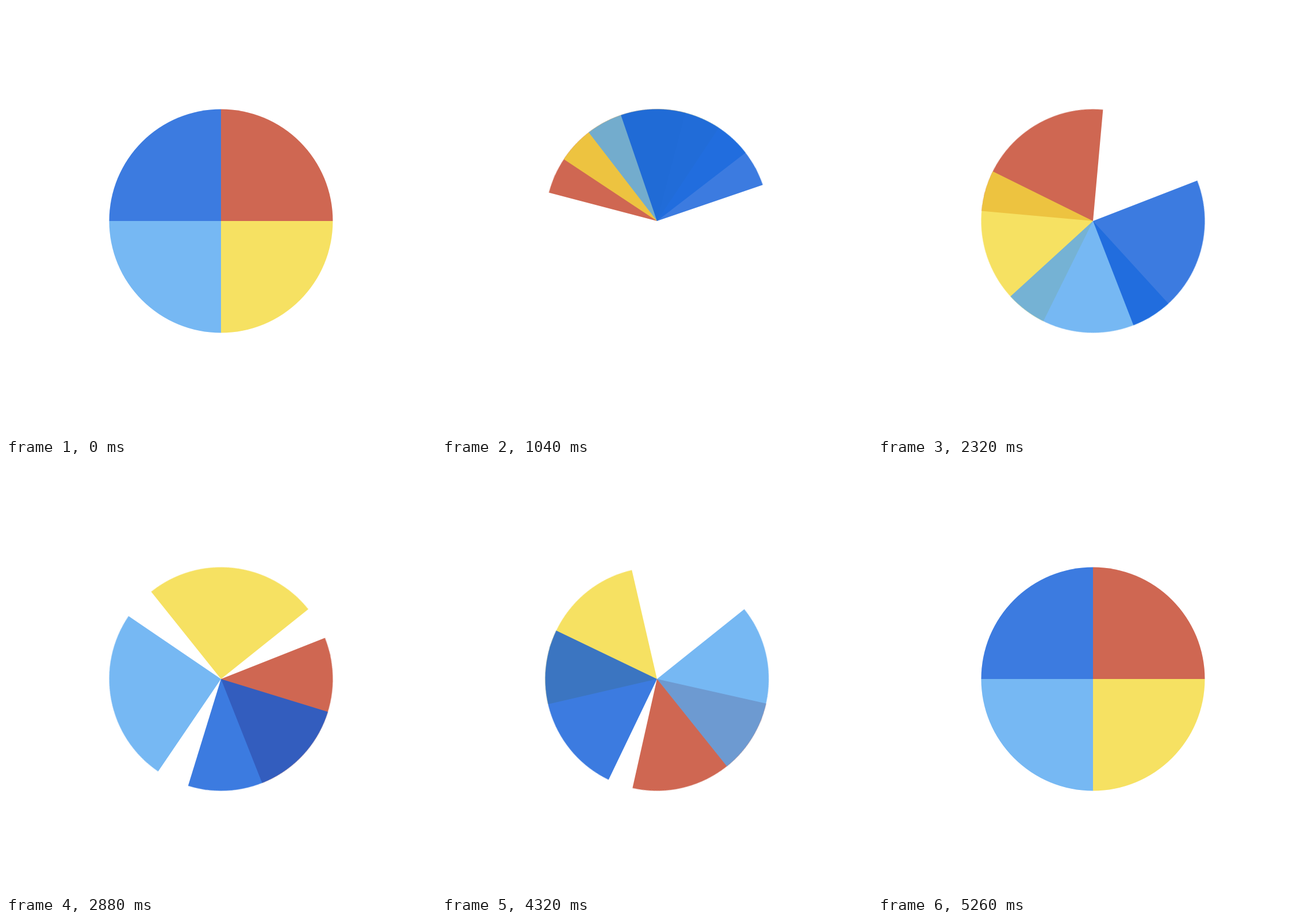
Recreate the animation shown at these times as an HTML page. Size 748 px wide and 748 px high, loop 5280 ms.

```html
<!DOCTYPE html>
<html lang="en">
<head>
<meta charset="utf-8">
<title>Turning quarters</title>
<style>
  html, body {
    margin: 0;
    width: 100%;
    height: 100%;
    overflow: hidden;
    background: #fff;
  }
  svg {
    display: block;
    width: 100%;
    height: 100%;
  }
  /* 264 ticks of 20 ms; the full turns are complete on the last tick,
     so the end value lies one tick beyond. The small lead keeps ticks crisp. */
  .quarter {
    opacity: .8;
    transform-origin: 374px 374px;
    animation: spin 5280ms steps(264, end) -4ms infinite;
  }
  @keyframes spin {
    from { transform: rotate(0deg); }
    to { transform: rotate(calc(var(--turns) * 360deg * 264 / 263)); }
  }
  .red    { --turns: 4; fill: #c34227; }
  .yellow { --turns: 3; fill: #f4da3b; }
  .sky    { --turns: 2; fill: #54a7f1; }
  .blue   { --turns: 1; fill: #0c5bd9; }
</style>
</head>
<body>
<svg viewBox="0 0 748 748">
  <path class="quarter red" d="M374 374V179.5A194.5 194.5 0 0 1 568.5 374Z"/>
  <path class="quarter yellow" d="M374 374H568.5A194.5 194.5 0 0 1 374 568.5Z"/>
  <path class="quarter sky" d="M374 374V568.5A194.5 194.5 0 0 1 179.5 374Z"/>
  <path class="quarter blue" d="M374 374H179.5A194.5 194.5 0 0 1 374 179.5Z"/>
</svg>
</body>
</html>
```
